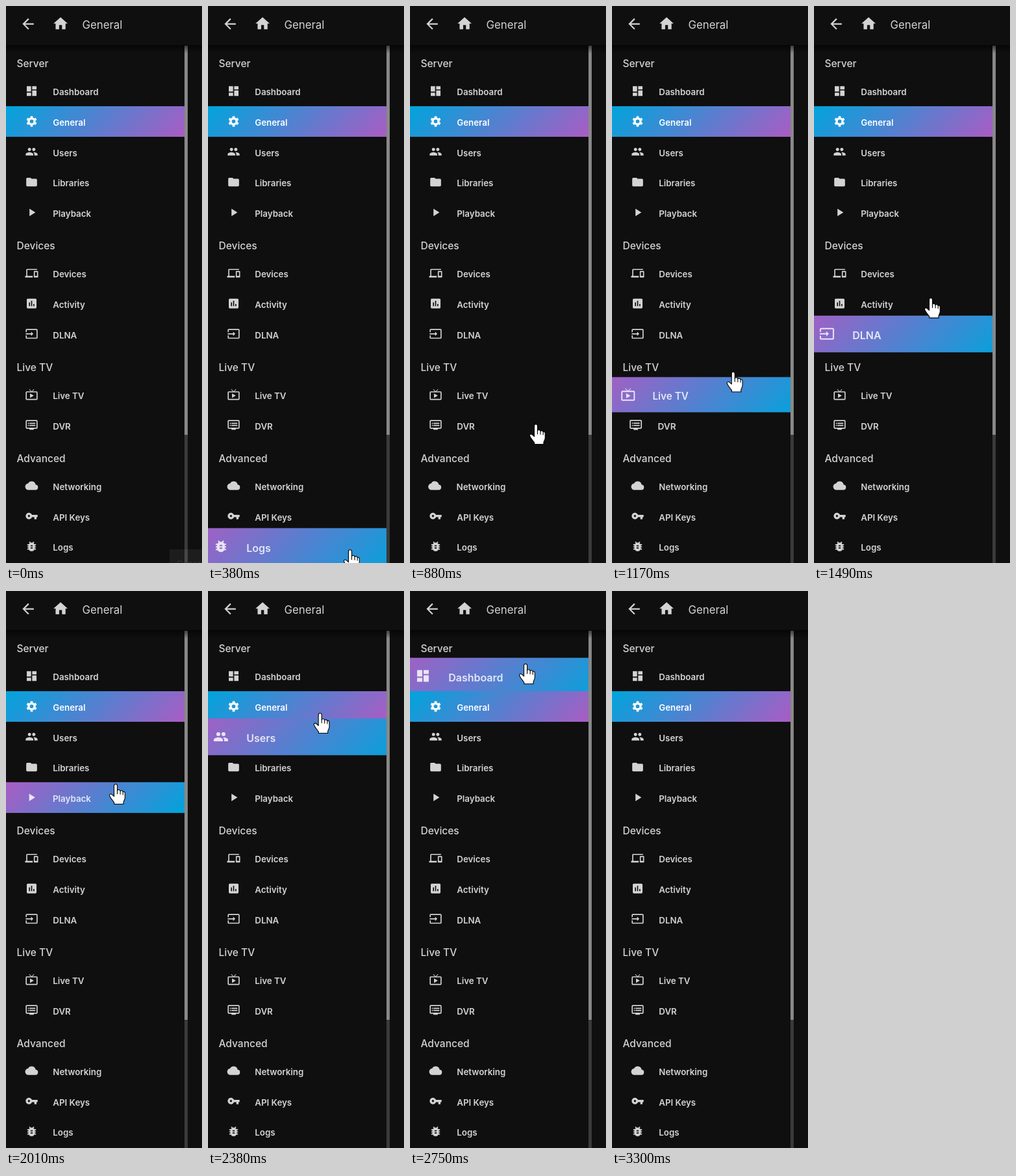
An HTML page that plays this animation: 302x856 px, repeating every 3330 ms.

```html
<!DOCTYPE html>
<html lang="en">
<head>
<meta charset="utf-8">
<title>Settings menu</title>
<style>
html, body { margin: 0; width: 100%; height: 100%; overflow: hidden; background: #0f0f0f; }
svg { display: block; }
text { font-family: Inter, "Noto Sans", sans-serif; fill: #fff; }
.item { fill: #fff; fill-opacity: .82; }
.item text { font-size: 13.3px; font-weight: 570; fill: inherit; }
.item.on { fill-opacity: 1; }
.head { font-size: 15.5px; font-weight: 500; fill: #d3d3d3; }
</style>
</head>
<body>
<svg id="stage" width="302" height="856" viewBox="0 0 302 856">
  <defs>
    <linearGradient id="active" gradientUnits="userSpaceOnUse" x1="57" y1="-80.5" x2="218" y2="80.5">
      <stop stop-color="#00a4dc"/><stop offset="1" stop-color="#aa5cc3"/>
    </linearGradient>
    <linearGradient id="hover" gradientUnits="userSpaceOnUse" x1="57" y1="-80.5" x2="218" y2="80.5">
      <stop stop-color="#aa5cc3"/><stop offset="1" stop-color="#00a4dc"/>
    </linearGradient>
    <linearGradient id="shade" x2="0" y2="1">
      <stop stop-color="#000" stop-opacity=".6"/><stop offset="1" stop-color="#000" stop-opacity="0"/>
    </linearGradient>
    <clipPath id="pane"><path d="M0 60H275V856H0z"/></clipPath>
  </defs>
  <rect width="302" height="856" fill="#0f0f0f"/>
  <g id="menu" clip-path="url(#pane)"></g>
  <rect x="275" y="61" width="5" height="795" fill="#3a3a3a"/>
  <rect x="275" y="61" width="5" height="598" fill="#888"/>
  <rect y="60" width="302" height="13" fill="url(#shade)"/>
  <g fill="#d3d3d3">
    <path transform="translate(21 14.5) scale(1.09)" d="M20 11H7.83l5.59-5.59L12 4l-8 8 8 8 1.41-1.41L7.83 13H20z"/>
    <path transform="translate(71 14) scale(1.09)" d="M10 20v-6h4v6h5v-8h3L12 3 2 12h3v8z"/>
  </g>
  <text x="117.5" y="35" font-size="16.8" style="fill:#d3d3d3">General</text>
  <g id="tip">
    <rect x="252" y="835" width="50" height="21" fill="#fff" fill-opacity=".06"/>
    <text x="263" y="862" font-size="13" style="fill:#333">General</text>
  </g>
  <g id="hand" stroke="#000" stroke-width="1.1" stroke-linejoin="round" stroke-linecap="round">
    <path fill="#fff" d="M-2.5 19V2.5a2.5 2.5 0 0 1 5 0V10c1-2 4.3-1.6 4.6.8c1.2-1.4 3.8-.9 4.1 1.2c1.4-1 3.1-.2 3.1 2v7c0 3-2 4.5-2.3 7v2.8H-2.3v-2.3C-4 26-7 23-9.2 18.5c-1.2-2.5 1.5-4.2 3.5-2.3z"/>
    <path fill="none" d="M2.5 10v5M7.1 11v4.5M11.2 12.2v4"/>
  </g>
</svg>
<script>
const LOOP = 3330, EASE_MS = 120, PITCH = 46.65, HEIGHT = 47, FIRST = 130.85, GROW = .2;
const NS = "http://www.w3.org/2000/svg";
const $ = id => document.getElementById(id);

function add(parent, tag, attrs, label) {
  const el = document.createElementNS(NS, tag);
  for (const k in attrs) el.setAttribute(k, attrs[k]);
  if (label) el.textContent = label;
  parent.appendChild(el);
  return el;
}

// label, icon, hover start and end in ms; a single entry is a heading
const rows = [
  ["Dashboard", "M3 13h8V3H3zm0 8h8v-6H3zm10 0h8V11h-8zm0-18v6h8V3z", 2565, 3175],
  ["General", null, 2390, 2540],
  ["Users", "M16 11a3 3 0 1 0 0-6a3 3 0 0 0 0 6zm-8 0a3 3 0 1 0 0-6a3 3 0 0 0 0 6zm0 2c-2.33 0-7 1.17-7 3.5V19h14v-2.5c0-2.33-4.67-3.5-7-3.5zm8 0c-.3 0-.6 0-1 .05 1.2.84 2 1.97 2 3.45V19h6v-2.5c0-2.33-4.67-3.5-7-3.5z", 2240, 2390],
  ["Libraries", "M10 4H4a2 2 0 0 0-2 2v12a2 2 0 0 0 2 2h16a2 2 0 0 0 2-2V8a2 2 0 0 0-2-2h-8z", 2055, 2240],
  ["Playback", "M8 5v14l11-7z", 2000, 2055],
  ["Devices"],
  ["Devices", "M4 6h18V4H4a2 2 0 0 0-2 2v11H0v3h14v-3H4zm19 2h-6a1 1 0 0 0-1 1v10a1 1 0 0 0 1 1h6a1 1 0 0 0 1-1V9a1 1 0 0 0-1-1zm-1 9h-4v-7h4z", 1590, 1790],
  ["Activity", "M19 3H5a2 2 0 0 0-2 2v14a2 2 0 0 0 2 2h14a2 2 0 0 0 2-2V5a2 2 0 0 0-2-2zM9 17H7v-7h2zm4 0h-2V7h2zm4 0h-2v-4h2z", 1510, 1590],
  ["DLNA", "M21 3H3a2 2 0 0 0-2 2v4h2V5h18v14H3v-4H1v4a2 2 0 0 0 2 2h18a2 2 0 0 0 2-2V5a2 2 0 0 0-2-2zM11 16l4-4-4-4v3H1v2h10z", 1360, 1510],
  ["Live TV"],
  ["Live TV", "M21 6h-7.6l3.3-3.3L16 2l-4 4-4-4-.7.7L10.6 6H3a2 2 0 0 0-2 2v12a2 2 0 0 0 2 2h18a2 2 0 0 0 2-2V8a2 2 0 0 0-2-2zm0 14H3V8h18zM9 10v8l7-4z", 1090, 1230],
  ["DVR", "M21 3H3a2 2 0 0 0-2 2v12a2 2 0 0 0 2 2h5v2h8v-2h5a2 2 0 0 0 2-2V5a2 2 0 0 0-2-2zm0 14H3V5h18zm-2-9H8v2h11zm0 4H8v2h11zM7 8H5v2h2zm0 4H5v2h2z", 895, 1080],
  ["Advanced"],
  ["Networking", "M19.35 10.04A7.5 7.5 0 0 0 5.35 8.04A6 6 0 0 0 6 20h13a5 5 0 0 0 .35-9.96z", 620, 780],
  ["API Keys", "M12.65 10a6 6 0 1 0 0 4H17v4h4v-4h2v-4zM7 14a2 2 0 1 1 0-4a2 2 0 0 1 0 4z", 480, 620],
  ["Logs", "M20 8h-2.8a5.5 5.5 0 0 0-1.8-2L17 4.4 15.6 3l-2.2 2.2a6 6 0 0 0-2.8 0L8.4 3 7 4.4 8.6 6a5.5 5.5 0 0 0-1.8 2H4v2h2.1L6 12H4v2h2l.1 2H4v2h2.8a6 6 0 0 0 10.4 0H20v-2h-2.1l.1-2h2v-2h-2l-.1-2H20zm-6 8h-4v-2h4zm0-4h-4v-2h4z", 190, 480]
];

function gear(parent) {
  const ring = { cx: 12, cy: 12, fill: "none", stroke: "#fff" };
  add(parent, "circle", { ...ring, r: 5.5, "stroke-width": 4 });
  add(parent, "circle", { ...ring, r: 8.2, "stroke-width": 3.2, pathLength: 12, "stroke-dasharray": "1 1", "stroke-dashoffset": -.5 });
}

const menu = $("menu"), items = [];
add(menu, "text", { class: "head", x: 16.5, y: 94 }, "Server");
rows.forEach(([label, icon, on, off], i) => {
  const y = FIRST + PITCH * i;
  if (on === undefined) {
    add(menu, "text", { class: "head", x: 16.5, y: Math.round(y + 10) }, label);
    return;
  }
  const active = !icon;
  const g = add(menu, "g", { class: active ? "item on" : "item" });
  const bg = add(g, "rect", { y: -HEIGHT / 2, width: 275, height: HEIGHT, "fill-opacity": 1 });
  const pic = add(g, "g", { transform: "translate(29.5 -10.2) scale(.833)" });
  if (active) gear(pic); else add(pic, "path", { d: icon });
  add(g, "text", { x: 72.3, y: 6.6 }, label);
  items.push({ g, bg, y, on, off, idle: active ? "url(#active)" : "none" });
});

// time, x, y of the fingertip
const path = [
  [60, 238, 872], [200, 228, 858], [380, 219, 836], [880, 194, 643], [1070, 189, 595],
  [1490, 180, 449], [1620, 177, 388], [1860, 172, 350], [2010, 169, 297], [2150, 169, 263],
  [2580, 176, 128], [2750, 178, 112], [2960, 190, 118], [3140, 262, 162], [3200, 273, 168]
];

function slope(i, k) {
  const a = path[Math.max(i - 1, 0)], b = path[Math.min(i + 1, path.length - 1)];
  return (b[k] - a[k]) / (b[0] - a[0]);
}

function along(t, k) {
  let i = 0;
  while (i < path.length - 2 && t > path[i + 1][0]) i++;
  const a = path[i], b = path[i + 1], d = b[0] - a[0], p = (t - a[0]) / d, q = 1 - p;
  return q * q * (1 + 2 * p) * a[k] + p * p * (1 + 2 * q) * b[k]
    + p * q * d * (q * slope(i, k) - p * slope(i + 1, k));
}

function ease(p) {
  p = Math.min(1, Math.max(0, p));
  return p * p * (3 - 2 * p);
}

function draw(t) {
  for (const { g, bg, y, on, off, idle } of items) {
    const level = ease((Math.min(t, off) - on) / EASE_MS) * (1 - ease((t - off) / EASE_MS));
    const s = 1 + GROW * level;
    g.setAttribute("transform", `translate(${137.5 * (1 - s)} ${y}) scale(${s})`);
    bg.setAttribute("fill", t >= on && t < off ? "url(#hover)" : idle);
  }
  const shown = t >= path[0][0] && t < path[path.length - 1][0];
  $("hand").setAttribute("visibility", shown ? "visible" : "hidden");
  if (shown) $("hand").setAttribute("transform", `translate(${along(t, 1)} ${along(t, 2)})`);
  $("tip").setAttribute("visibility", t < 30 ? "visible" : "hidden");
}

const start = performance.now();
function tick() {
  draw((performance.now() - start) % LOOP);
  requestAnimationFrame(tick);
}
draw(0);
requestAnimationFrame(tick);
</script>
</body>
</html>
```
